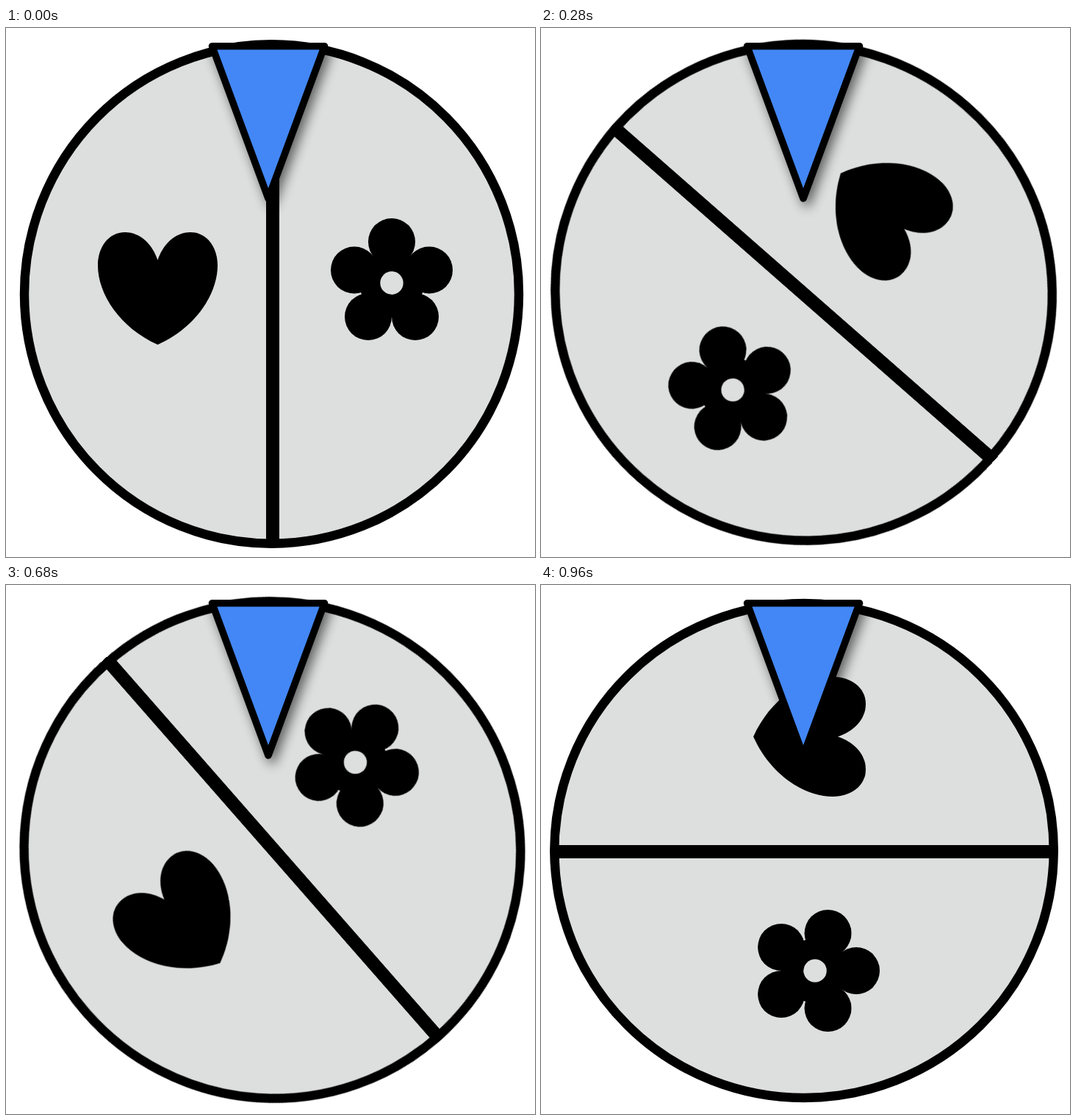
Animation, 720 px wide and 720 px high, one loop 1.96 s. Source, as an HTML page:

```html
<!DOCTYPE html>
<html lang="en">
<head>
<meta charset="utf-8">
<title>Spinning wheel</title>
<style>
  html, body { margin: 0; width: 100%; height: 100%; overflow: hidden; background: #fff; }
  svg { display: block; width: 100vw; height: 100vh; }
  #wheel { transform-origin: 360px 360px; }
</style>
</head>
<body>
<svg viewBox="0 0 720 720">
  <defs>
    <path id="pointer" d="M280.5 24.7H433.5L357 232Z" stroke="#000" stroke-width="9.6" stroke-linejoin="round"/>
    <clipPath id="disc"><circle cx="360" cy="360" r="338"/></clipPath>
    <filter id="blur" filterUnits="userSpaceOnUse" x="220" y="-40" width="280" height="360">
      <feGaussianBlur stdDeviation="8"/>
    </filter>
  </defs>

  <g id="wheel">
    <ellipse cx="361.5" cy="362" rx="336.5" ry="339.7" fill="#dddfde" stroke="#000" stroke-width="12.4"/>
    <path d="M363 25V700" stroke="#000" stroke-width="18"/>
    <path d="M206.5 316C200 296 184 278 162 278C139 278 125 299 125 323C125 362 155 408 206.5 431
             C258 408 288 362 288 323C288 299 274 278 251 278C229 278 213 296 206.5 316Z"/>
    <g id="flower"></g>
  </g>

  <g clip-path="url(#disc)">
    <use href="#pointer" x="5" y="7" opacity=".58" filter="url(#blur)"/>
  </g>
  <use href="#pointer" fill="#4387f6"/>
</svg>
<script>
  const STEP = 40, STEPS = 24, LOOP = 1960, TURN = 450;

  const petals = [[525, 291], [576, 329.5], [557, 393], [493, 393], [474, 329.5]];
  const circle = (x, y, r, fill) => `<circle cx="${x}" cy="${y}" r="${r}" fill="${fill}"/>`;
  document.getElementById('flower').innerHTML =
    `<polygon points="${petals.join(' ')}"/>` +
    petals.map(([x, y]) => circle(x, y, 32, '#000')).join('') +
    circle(525, 347, 15.7, '#dddfde');

  // Even steps through one and a quarter turns, then a rest.
  const rotate = deg => `rotate(${deg}deg)`;
  document.getElementById('wheel').animate([
    { transform: rotate(0), offset: 0, easing: `steps(${STEPS}, end)` },
    { transform: rotate(TURN), offset: STEP * STEPS / LOOP },
    { transform: rotate(TURN), offset: 1 }
  ], { duration: LOOP, iterations: Infinity, delay: -1 });
</script>
</body>
</html>
```
